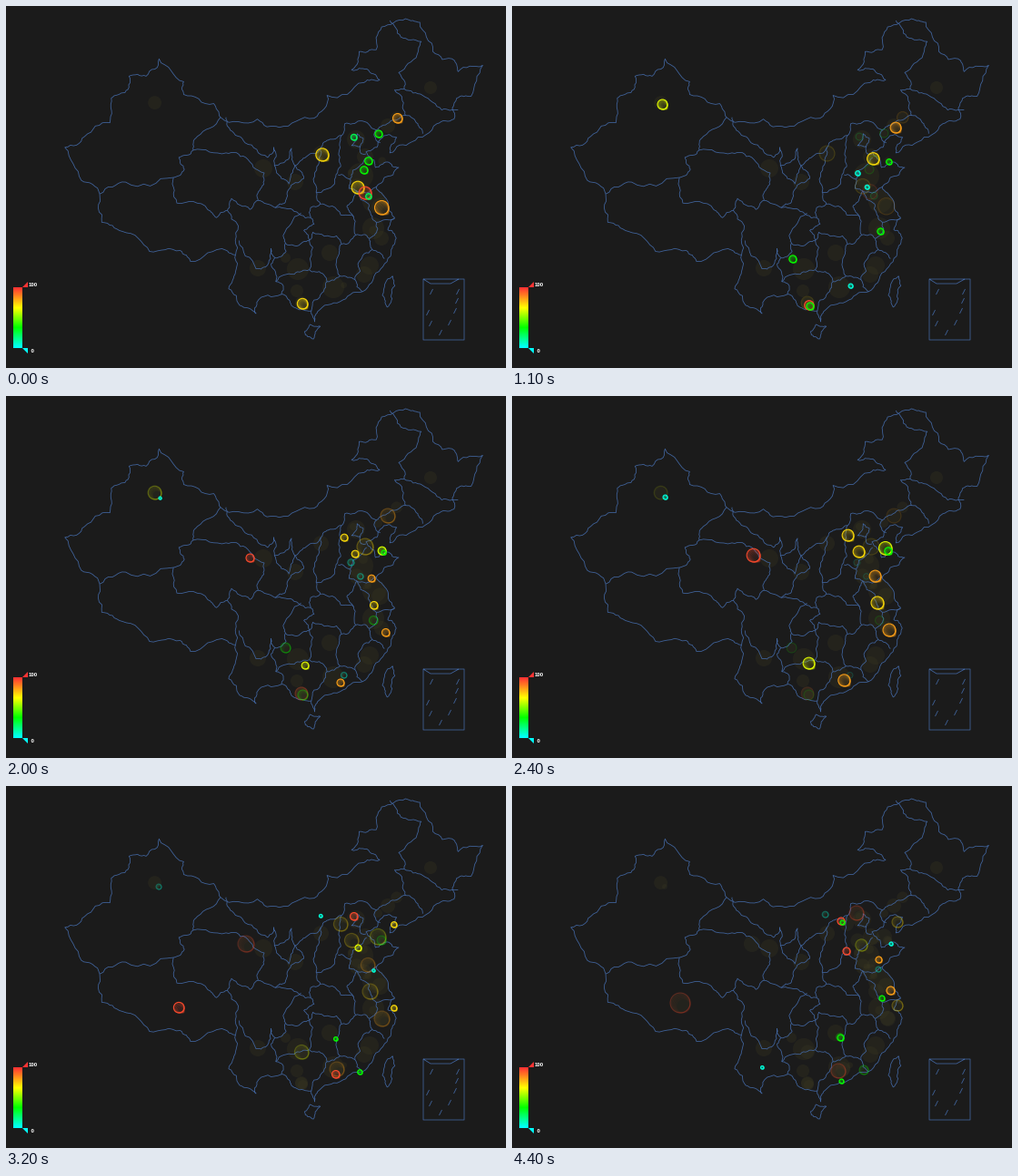
A matplotlib script that plays this animation: 550x399 px, repeating every 4.5 s.

```python
import numpy as np
import matplotlib.pyplot as plt
from matplotlib.animation import FuncAnimation
from matplotlib.collections import LineCollection
from matplotlib.colors import LinearSegmentedColormap

W, H, DPI = 550, 399, 100
PX = 72 / DPI
STEP, FRAMES = 100, 45
FADE = 400
BACK, LINE = "#1b1b1b", "#41659f"
heat = LinearSegmentedColormap.from_list("heat", ["#00ffff", "#00ff00", "#ffff00", "#ff3333"])
CYAN, TEAL, GREEN, YELLOW, AMBER, ORANGE, RED = (heat(v) for v in (.05, .22, .34, .63, .72, .82, .96))
rng = np.random.default_rng(4)

# Points where borders meet (longitude, latitude)
w1, w2, w3, w4 = (78.7, 34.3), (96.4, 42.7), (98.6, 27.6), (89.5, 36.1)
w5, w6, w7, w8 = (97.4, 32.5), (92.4, 39.1), (101.9, 33.6), (104.4, 32.8)
c1, c2, c3, c4 = (109.6, 31.7), (111, 33.2), (115.9, 31.8), (104.3, 37.4)
c5, c6, c7, c8 = (107.3, 37.4), (111.1, 39.4), (114.1, 40.7), (110.4, 34.5)
n1, n2, n3, n4 = (119.2, 41.3), (123.5, 42.9), (123.3, 45.8), (124.4, 40)
e1, e2, e3, e4 = (116.8, 39.5), (115.4, 35.9), (116.4, 34.6), (119.2, 31.2)
s1, s2, s3, s4 = (116.2, 29.8), (118.2, 29.4), (118.6, 28.2), (116.1, 24.9)
s5, s6, s7, s8 = (114.1, 28.8), (113.9, 25.3), (109.4, 29.2), (105.9, 28.9)
s9, t1, t2, t3 = (104.4, 27.3), (104.5, 24.7), (109.4, 26), (112, 24.7)
t4 = (105.3, 23.3)

FRONTIER = [
    w1, (76, 35.8), (73.6, 39.4), (76.5, 40.6), (80.2, 42.1), (80.4, 44.8), (82.4, 45.4), (83, 47.2),
    (85.5, 47.2), (87.4, 49.1), (91, 46.6), (91, 45.2), (95.4, 44.2), w2, (101.8, 42.5), (105, 41.6),
    (110.1, 42.6), (112, 45.1), (117.4, 46.5), (119.7, 46.8), (117.8, 48), (115.6, 47.9), (116.7, 49.9),
    (119.2, 50.1), (120, 52.6), (123.5, 53.5), (125.6, 53.1), (127.5, 49.9), (130.7, 48.9),
    (131.2, 47.7), (134.8, 48.4), (133.1, 45), (131, 44.8), (130.6, 42.5), (128.1, 42), n4,
]
COAST = [
    n4, (121.2, 38.8), (122.2, 40.5), (121, 40.8), (119.3, 39.4), (117.7, 38.9), (118.9, 38),
    (119.1, 37.2), (120.8, 37.8), (122.5, 37.2), (120.4, 36.1), (119.2, 34.9), (120.4, 34),
    (121.9, 31.7), (120.9, 30.4), (121.9, 29.9), (121.4, 28.2), (119.6, 25.8), (117.2, 23.6),
    (113.9, 22.5), (110.6, 21.4), (110.2, 20.3), (109.7, 21.5), (108, 21.6), (106.6, 22.4), t4,
    (101.7, 22.4), (101.6, 21.2), (99.2, 22.1), (97.6, 23.9), (98.6, 25.8), w3, (97.3, 28.1),
    (92, 26.9), (90.5, 28.1), (86, 28), (82, 30.2), (79, 31.2), w1,
]
ISLANDS = [
    [(121.6, 25.3), (121.4, 23.2), (120.8, 21.9), (120.1, 23.2), (121.6, 25.3)],
    [(111, 19.8), (110, 18.4), (108.7, 19.2), (109.5, 20), (111, 19.8)],
]
WEST = [
    [w1, (82.5, 35.6), w4, (91.1, 37), (90.3, 38.3), w6, (93, 40.6), w2],
    [w4, (90, 33.3), (94.5, 32.6), (95.8, 31.7), w5, (99, 30.8), w3],
    [w5, (98, 33.8), (100.7, 32.6), w7, w8, (106.9, 32.6), c1, (109.6, 32.8), c2, (114, 32), c3],
    [w6, (97.2, 38.8), (100.1, 38.3), (102.8, 36.6), (102.4, 35), w7],
    [(97.2, 42.7), (97.8, 41.3), (100, 39.9), (103.3, 38.3), (104.2, 39.4), c4, (105.8, 37.8),
     (106.8, 39.3), c5, (109, 38.4), c6],
    [c4, (105.3, 36), (106.4, 35.4), c5, (108.6, 36), (106.4, 34.8), (105.9, 33.4), w8],
]
NORTH = [
    [c6, (112.2, 40.2), c7, (114.6, 42), (116.8, 42.3), n1, (121.3, 42.3), n2, (125.3, 42), (126, 40.9)],
    [c2, c8, (110.5, 37.3), c6],
    [c7, (113.7, 38.6), (114, 37.3), (113.1, 35.4), c8],
    [n2, (123.2, 44.3), (121.9, 45.7), n3, (126, 45.1), (128.8, 43.5), (131.2, 43.5)],
    [n3, (122.5, 47.6), (125.2, 49.6), (125.8, 51), (122.8, 51.5), (121.2, 53.3)],
    [n1, (118.9, 40.7), (119.8, 39.9)],
    [e1, (115.6, 39.6), (116.4, 40.9), (117.3, 40.4), e1, (117, 38.7), (117.7, 38.7)],
]
EAST = [
    [(117.8, 38.3), (115.8, 36.9), e2, (115.2, 34.9), e3, (118.2, 34.5), (119.3, 35.1)],
    [(113.6, 36.4), e2],
    [e3, (115.6, 33.4), (114.9, 32.9), c3, s1],
    [e3, (118.1, 33.2), (118.4, 32.1), e4, (121.9, 31.6)],
    [e4, (119.4, 30.4), s2, s1, s5, (113.4, 29.7), (109.9, 30.1), s7, (108.6, 30.3), (110.1, 31), c1],
    [s2, s3, (120.4, 27.2)],
    [s3, (116.7, 26.9), s4, (117.2, 23.6)],
    [s4, s6, (113.8, 27.8), s5],
]
SOUTH = [
    [s7, (108.4, 29), s8, (105.6, 29.8), (108.2, 32.2)],
    [s8, (106, 28), s9, (103.8, 26.6), t1],
    [s9, (103.8, 28.3), (103, 26.3), (101.6, 26.1), (99.1, 29.2)],
    [t4, (105.6, 24.2), t1, (107.2, 25.5), t2, (111.3, 25.6), t3, s6],
    [s7, t2],
    [t3, (111.3, 23.5), (109.7, 21.5)],
]

# Bubbles: right edge, bottom edge, full radius, colour
FIRST = [
    (436, 129, 6.3, ORANGE), (414, 145, 4.8, GREEN), (386, 148, 4, TEAL), (355, 171, 8.5, AMBER),
    (403, 175, 5, GREEN), (398, 185, 5, GREEN), (394, 207, 8.3, AMBER), (402, 213, 8.3, RED),
    (402, 213, 3.8, TEAL), (421, 230, 9.3, ORANGE), (332, 334, 7, AMBER),
]
SECOND = [
    (171, 114, 7.4, YELLOW), (428, 140, 8, ORANGE), (404, 175, 9, AMBER), (418, 175, 4.3, GREEN),
    (383, 187, 3.6, CYAN), (393, 202, 3.2, CYAN), (409, 252, 4.8, GREEN), (313, 283, 5.5, GREEN),
    (375, 311, 3.3, CYAN), (332, 335, 7, RED), (332, 335, 5.5, GREEN),
]
THIRD = [
    (273, 183, 9, RED), (376, 160, 7.8, AMBER), (388, 178, 7.8, AMBER), (418, 175, 8.8, YELLOW),
    (418, 175, 5, GREEN), (406, 205, 7.8, ORANGE), (409, 235, 8.5, AMBER), (422, 265, 8.5, ORANGE),
    (333, 301, 7.8, YELLOW), (372, 320, 8, ORANGE), (171, 114, 3, CYAN),
]
FOURTH = [
    (196, 250, 11, RED), (387, 148, 8, RED), (430, 156, 6, AMBER), (391, 182, 6.6, YELLOW),
    (348, 145, 3.4, CYAN), (406, 205, 3, CYAN), (430, 248, 6, AMBER), (365, 281, 4.2, GREEN),
    (392, 318, 5, GREEN), (367, 322, 8, RED),
]
FIFTH = [
    (366, 153, 8, RED), (366, 153, 5, GREEN), (372, 186, 8, RED), (419, 176, 4, CYAN),
    (407, 195, 7, ORANGE), (421, 230, 9, ORANGE), (410, 237, 6, GREEN), (365, 281, 7, GREEN),
    (277, 312, 3.5, CYAN), (365, 328, 5, GREEN),
]
BURSTS = [(-1000, 200, FIRST), (100, 1450, SECOND), (1380, 2620, THIRD),
          (2530, 3800, FOURTH), (3800, 5000, FIFTH)]

# Faint discs on the map: x, y, radius
STAINS = [
    (467, 90, 7), (283, 179, 10), (318, 194, 9), (277, 289, 9), (321, 290, 12), (385, 147, 10),
    (390, 187, 14), (405, 215, 13), (404, 245, 12), (356, 272, 9), (360, 310, 12), (400, 286, 10),
    (394, 296, 9), (413, 256, 8), (320, 314, 7),
]


def project(points):
    lon, lat = np.array(points).T
    return np.column_stack([64 + 7.51 * (lon - 73.5), 14 + 10.06 * (53.5 - lat)])


def roughen(pts, rounds=3):
    for _ in range(rounds):
        d = np.diff(pts, axis=0)
        normal = np.column_stack([-d[:, 1], d[:, 0]])
        out = np.empty((2 * len(pts) - 1, 2))
        out[::2] = pts
        out[1::2] = pts[:-1] + d / 2 + rng.uniform(-.17, .17, (len(d), 1)) * normal
        pts = out
    return pts


def sizes(radii):
    return (2 * np.asarray(radii) * PX) ** 2


def discs(bubbles):
    return [(x - r, y - r, r) for x, y, r, _ in bubbles]


fig = plt.figure(figsize=(W / DPI, H / DPI), dpi=DPI, facecolor=BACK)
ax = fig.add_axes([0, 0, 1, 1])
ax.axis("off")

ax.imshow(np.linspace(1, 0, 68)[:, None], cmap=heat, vmin=0, vmax=1,
          extent=(8, 18, 377, 310), aspect="auto")
for y, tip, text_y, value, label in [(310, -6, 307.5, 1.0, "100"), (377, 6, 380, 0.0, "  0")]:
    ax.fill([17.5, 24, 24], [y, y, y + tip], color=heat(value), lw=0)
    ax.text(24.5, text_y, label, color="white", fontsize=6.2 * PX, family="Liberation Sans",
            weight="bold", va="center")

sx, sy, sr = np.array(STAINS + discs(FIRST) + discs(SECOND)).T
ax.scatter(sx, sy, s=sizes(sr), c="#3d3a22", alpha=.28, lw=0, zorder=1)

borders = [FRONTIER, COAST] + ISLANDS + WEST + NORTH + EAST + SOUTH
lines = [roughen(project(b)) for b in borders]
lines.append([(459, 301), (504, 301), (504, 368), (459, 368), (459, 301), (467, 306), (489, 306), (498, 301)])
for x, y in [(468, 315), (497, 315), (496, 325), (494, 336), (488, 349), (478, 360), (467, 350), (464, 338)]:
    lines.append([(x + 1.5, y - 3), (x - 1.5, y + 3)])
ax.add_collection(LineCollection(lines, colors=LINE, linewidths=.8 * PX, zorder=2))

stains = ax.scatter([], [], lw=0, zorder=1)
rings = ax.scatter([], [], linewidths=1.1 * PX, zorder=3)
ax.set_xlim(0, W)
ax.set_ylim(H, 0)


def rings_at(t):
    """Rings of every burst, with older, smaller rings fading behind."""
    out, left = [], []
    for start, end, bubbles in BURSTS:
        last = min(t, end)
        if t <= start:
            continue
        if t > end and start > STEP:
            left += discs(bubbles)
        if t - last > 1050:
            continue
        stamps = [(s, .42) for s in np.arange(start + 60, last, 75)] + [(last, .95)]
        for x, y, size, color in bubbles:
            for s, strength in stamps:
                r = size * (s - start) / (end - start)
                alpha = strength * np.exp((s - t) / FADE)
                if alpha > .03:
                    out.append((x - r, y - r, r, *color[:3], alpha))
    return np.array(out), np.array(left).reshape(-1, 3)


def draw(i):
    ring, left = rings_at(i * STEP)
    rings.set_offsets(ring[:, :2])
    rings.set_sizes(sizes(ring[:, 2]))
    rings.set_edgecolors(ring[:, 3:])
    rings.set_facecolors("none")
    stains.set_offsets(left[:, :2])
    stains.set_sizes(sizes(left[:, 2]))
    stains.set_facecolors([(.24, .23, .15, .25)])
    return rings, stains


anim = FuncAnimation(fig, draw, frames=FRAMES, interval=STEP, repeat=True, repeat_delay=0)
plt.show()
```
